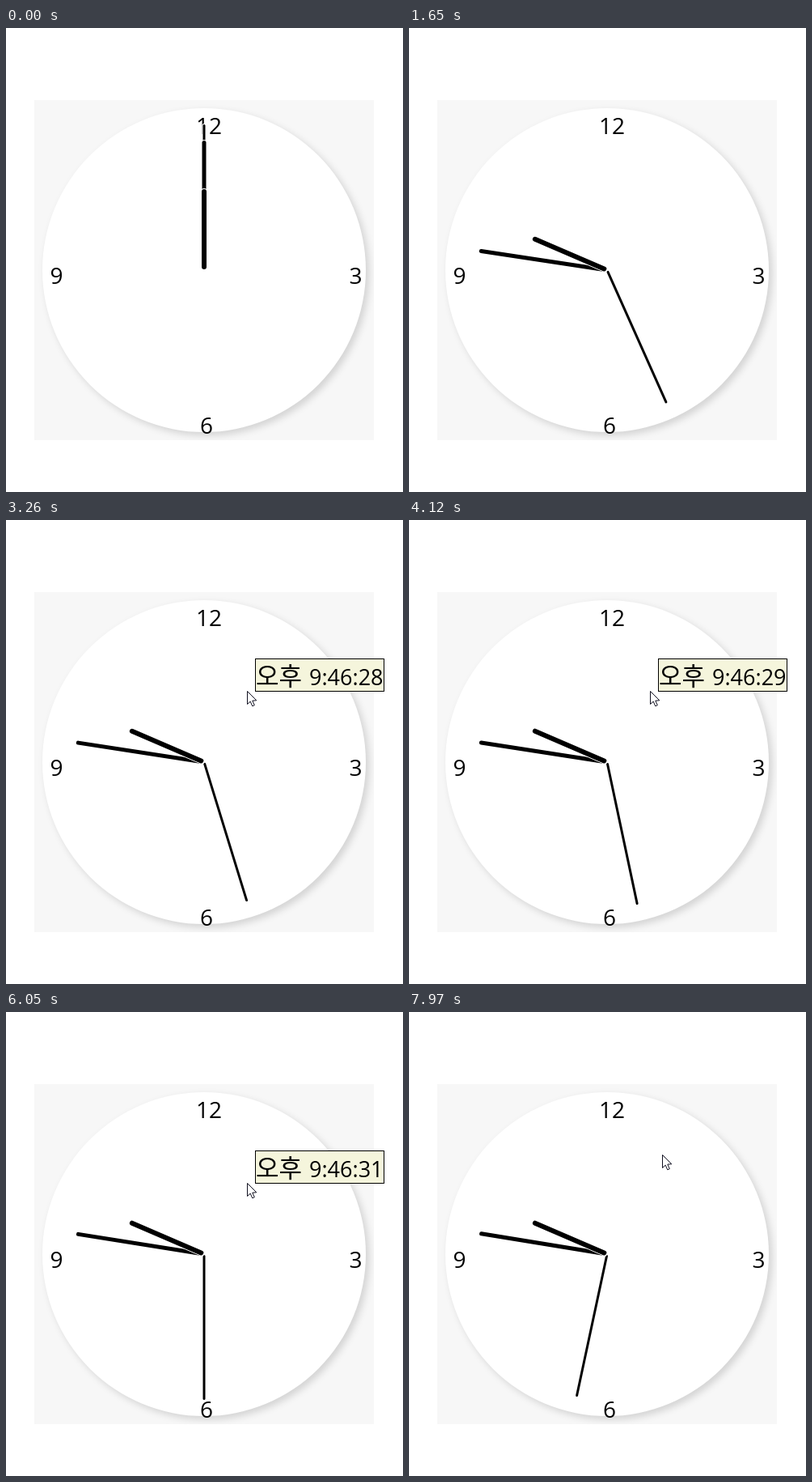
Animation, 491 px wide and 573 px high, one loop 8000 ms. Source, as an HTML page with a canvas:

```html
<!DOCTYPE html>
<html lang="ko">
<head>
<meta charset="utf-8">
<title>Clock</title>
<style>
  html, body { margin: 0; width: 100%; height: 100%; overflow: hidden; background: #fff; }
  canvas { display: block; width: 491px; height: 573px; }
</style>
</head>
<body>
<canvas id="stage" width="491" height="573"></canvas>
<script>
const ctx = document.getElementById('stage').getContext('2d');
const LOOP = 8000, CX = 245, CY = 299, R = 200;
const LATIN = '"Open Sans", "Noto Sans", sans-serif';
const HANGUL = '"Noto Sans CJK KR", "Noto Sans CJK", sans-serif';

// Start of each second, beginning at 9:46:25
const ticks = [268, 1250, 2200, 3140, 4120, 5080, 6050, 6985, 7930];
const FIRST = 25, MOVE = 500;

// Pointer position: time, x, y
const path = [
  [2380, 491, 262], [2440, 380, 225], [2500, 301, 208], [2640, 299, 208],
  [2870, 299, 208], [2880, 298, 208], [3140, 298, 208], [3150, 298, 211],
  [7810, 298, 211], [7940, 313, 179], [7965, 313, 176]
];

const bez = (s, a, b) => 3 * (1 - s) * (1 - s) * s * a + 3 * (1 - s) * s * s * b + s * s * s;

function ease(x) {
  if (x <= 0) return 0;
  if (x >= 1) return 1;
  let lo = 0, hi = 1;
  for (let i = 0; i < 24; i++) {
    const mid = (lo + hi) / 2;
    if (bez(mid, 0.42, 0.53) < x) lo = mid; else hi = mid;
  }
  return bez(lo, 0, 1.15);
}

function angles(sec) {
  const min = 46 + sec / 60;
  return [sec * 6, min * 6, 270 + min / 2];
}

function tickAt(t) {
  let i = -1;
  while (i + 1 < ticks.length && ticks[i + 1] <= t) i++;
  return i;
}

function handAngles(t) {
  const i = tickAt(t);
  if (i < 0) return [0, 0, 0];
  const from = i ? angles(FIRST + i - 1) : [0, 0, 0];
  const p = ease((t - ticks[i]) / MOVE);
  return angles(FIRST + i).map((to, k) => from[k] + (to - from[k]) * p);
}

function pointerAt(t) {
  if (t < path[0][0]) return null;
  for (let i = 1; i < path.length; i++) {
    const [t0, x0, y0] = path[i - 1], [t1, x1, y1] = path[i];
    if (t < t1) {
      const p = (t - t0) / (t1 - t0);
      return [Math.round(x0 + (x1 - x0) * p), Math.round(y0 + (y1 - y0) * p)];
    }
  }
  return path[path.length - 1].slice(1);
}

function text(str, x, y, font, align = 'left') {
  ctx.font = font;
  ctx.textAlign = align;
  ctx.fillStyle = '#000';
  ctx.fillText(str, x, y);
}

function bar(w, top, bottom, color) {
  ctx.fillStyle = color;
  ctx.beginPath();
  ctx.roundRect(-w / 2, top, w, bottom - top, w / 2);
  ctx.fill();
}

function drawFace() {
  ctx.fillStyle = '#fff';
  ctx.fillRect(0, 0, 491, 573);
  ctx.save();
  ctx.beginPath();
  ctx.rect(35, 89, 420, 420);
  ctx.clip();
  ctx.fillStyle = '#f7f7f7';
  ctx.fillRect(35, 89, 420, 420);
  ctx.shadowColor = 'rgba(0,0,0,0.15)';
  ctx.shadowBlur = 10;
  ctx.shadowOffsetX = ctx.shadowOffsetY = 4;
  ctx.fillStyle = '#fff';
  ctx.beginPath();
  ctx.arc(CX, CY, R, 0, Math.PI * 2);
  ctx.fill();
  ctx.restore();
  const font = '28px ' + LATIN;
  text('12', 251, 131, font, 'center');
  text('3', 432.5, 316, font, 'center');
  text('6', 248, 501, font, 'center');
  text('9', 62.5, 316, font, 'center');
}

function drawHand(deg, len, w) {
  ctx.save();
  ctx.translate(CX, CY);
  ctx.rotate(deg * Math.PI / 180);
  bar(w + 2, -len - 1, 0, '#fff');
  bar(w, -len, -1, '#000');
  ctx.restore();
}

function drawTip(x, y, sec) {
  ctx.fillStyle = '#000';
  ctx.fillRect(x, y, 160, 41);
  ctx.fillStyle = '#f5f5dc';
  ctx.fillRect(x + 1, y + 1, 158, 39);
  text('오후', x + 1, y + 33, '300 31px ' + HANGUL);
  text('9:46:' + sec, x + 67, y + 33, '27px ' + LATIN);
}

function drawPointer(x, y) {
  ctx.save();
  ctx.translate(x + 0.5, y + 0.5);
  ctx.beginPath();
  ctx.moveTo(0, 0);
  for (const [px, py] of [[0, 16], [3.7, 12.6], [6.2, 18.3], [8.8, 17.2], [6.3, 11.6], [11.3, 11.3]])
    ctx.lineTo(px, py);
  ctx.closePath();
  ctx.fillStyle = '#fff';
  ctx.fill();
  ctx.strokeStyle = '#101020';
  ctx.lineWidth = 1;
  ctx.stroke();
  ctx.restore();
}

function draw(t) {
  drawFace();
  const [s, m, h] = handAngles(t);
  drawHand(s, 180, 3);
  drawHand(m, 160, 5);
  drawHand(h, 100, 6);
  const pos = pointerAt(t);
  if (!pos) return;
  const [x, y] = pos;
  const inside = Math.hypot(x - CX, y - CY) < R;
  const tipOn = t < 6980 || (t >= 7820 && t < 7960);
  if (inside && tipOn) drawTip(x + 10, y - 40, FIRST + tickAt(t));
  drawPointer(x, y);
}

const start = performance.now();
function loop() {
  draw((performance.now() - start) % LOOP);
  requestAnimationFrame(loop);
}
loop();
</script>
</body>
</html>
```
